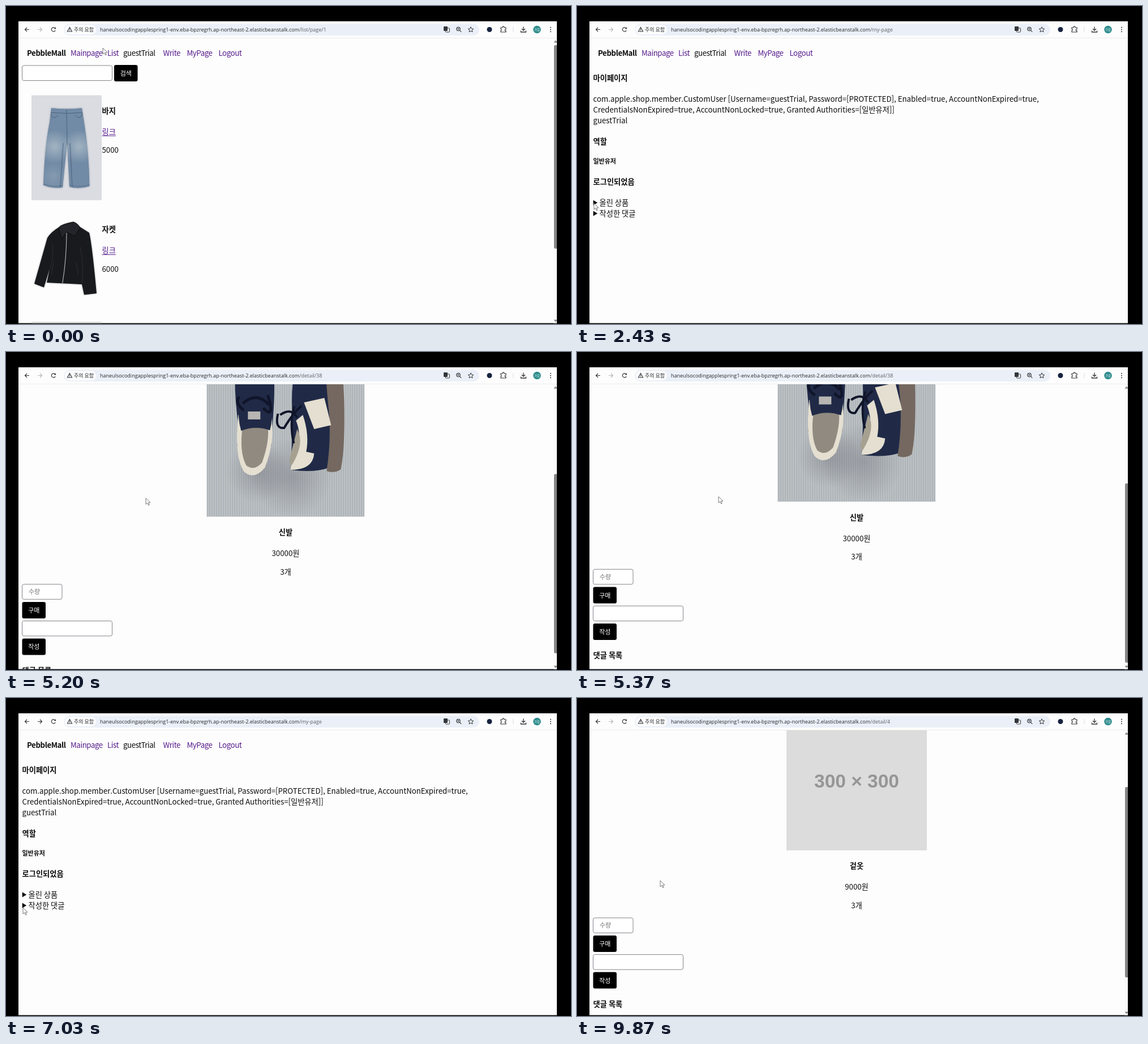
Animation, 998 px wide and 561 px high, one loop 9910 ms. Source, as an HTML page with a canvas:

```html
<!DOCTYPE html>
<html lang="ko">
<head>
<meta charset="utf-8">
<style>
html, body { margin: 0; width: 100%; height: 100%; overflow: hidden; background: #000; }
canvas { display: block; }
</style>
</head>
<body>
<canvas id="stage" width="998" height="561"></canvas>
<script>
const ctx = document.getElementById('stage').getContext('2d');
const LOOP = 9910;
const KR = '"Noto Sans CJK KR", "Noto Sans KR", "Noto Sans CJK", sans-serif';
const UI = '"Open Sans", "Noto Sans", sans-serif';
const BODY = 13.25, SMALL = 11;
const PURPLE = '#551a8b', INK = '#0c0c0c', PAGE = '#fdfdfd', ICON = '#33363a';
const USER = 'guestTrial';
const HOST = 'haneulsocodingapplespring1-env.eba-bpzregrh.ap-northeast-2.elasticbeanstalk.com';
const VIEW = { x: 22, y: 27, right: 973, bottom: 559.5, pageTop: 57 };

const pages = [
  { from: 0, path: '/list/page/1', draw: listPage },
  { from: 1500, path: '/my-page', draw: myPage },
  { from: 4250, path: '/detail/38', draw: shoePage },
  { from: 5900, path: '/my-page', draw: myPage },
  { from: 8200, path: '/detail/4', draw: coatPage }
];
const loading = [[1300, 1700], [4150, 4650], [5860, 6000], [8080, 8600]];
const pointer = [
  [250, 171, 74], [1000, 340, 84], [1550, 340, 84], [2300, 30, 348], [2650, 30, 348],
  [3500, 39.5, 448], [4550, 39.5, 448], [5250, 250, 255], [5450, 250, 255], [5750, 37, 42],
  [5920, 37, 42], [6800, 30, 370], [7250, 30, 370], [7850, 33, 469], [8600, 33, 469], [9400, 147, 322]
];

const between = (t, a, b) => t >= a && t < b;
function ease(t, a, b) {
  const k = Math.min(1, Math.max(0, (t - a) / (b - a)));
  return k * k * (3 - 2 * k);
}

// y is the optical middle of the line
function text(str, x, y, { size = BODY, weight = 400, color = INK, align = 'left', family = KR, spacing = 0 } = {}) {
  ctx.font = `${weight} ${size}px ${family}`;
  ctx.letterSpacing = spacing + 'px';
  ctx.textAlign = align;
  ctx.fillStyle = color;
  ctx.fillText(str, x, y + size * 0.365);
  return ctx.measureText(str).width;
}
const bold = (str, x, y, more) => text(str, x, y, { weight: 700, ...more });
function link(str, x, y) {
  const w = text(str, x, y, { color: PURPLE });
  ctx.fillRect(x, y + 6.5, w, 1);
}
function box(x, y, w, h, r, fill, stroke) {
  ctx.beginPath();
  ctx.roundRect(x, y, w, h, r);
  if (fill) { ctx.fillStyle = fill; ctx.fill(); }
  if (stroke) { ctx.strokeStyle = stroke; ctx.lineWidth = 1; ctx.stroke(); }
}
function shape(d, fill, stroke, width = 1) {
  const p = new Path2D(d);
  if (fill) { ctx.fillStyle = fill; ctx.fill(p); }
  if (stroke) { ctx.strokeStyle = stroke; ctx.lineWidth = width; ctx.stroke(p); }
}
function disc(x, y, r, fill, stroke, width = 1) {
  ctx.beginPath();
  ctx.arc(x, y, r, 0, Math.PI * 2);
  if (fill) { ctx.fillStyle = fill; ctx.fill(); }
  if (stroke) { ctx.strokeStyle = stroke; ctx.lineWidth = width; ctx.stroke(); }
}
function glow(x, y, r, rgb, alpha) {
  const g = ctx.createRadialGradient(x, y, 0, x, y, r);
  g.addColorStop(0, `rgba(${rgb},${alpha})`);
  g.addColorStop(1, `rgba(${rgb},0)`);
  ctx.fillStyle = g;
  ctx.fillRect(x - r, y - r, r * 2, r * 2);
}
const field = (x, y, w) => box(x, y, w, 26.5, 3, '#fff', '#85858d');
function button(label, x, y, w) {
  box(x, y, w, 29, 3, '#000');
  text(label, x + w / 2, y + 15, { size: SMALL, color: '#fff', align: 'center' });
}

function toolbar(t, page) {
  ctx.fillStyle = PAGE;
  ctx.fillRect(VIEW.x, VIEW.y, VIEW.right - VIEW.x, 30);
  ctx.fillStyle = '#ececea';
  ctx.fillRect(VIEW.x, 56, VIEW.right - VIEW.x, 1);

  const forwardOn = between(t, 5900, 8200);
  shape('M41 41.5H33.5M37 38L33.5 41.5L37 45', null, ICON, 1.2);
  shape('M56 41.5H63.5M60 38L63.5 41.5L60 45', null, forwardOn ? ICON : '#b4b6b9', 1.2);
  if (loading.some(([a, b]) => between(t, a, b))) {
    shape('M81 38.5L87 44.5M87 38.5L81 44.5', null, ICON, 1.2);
  } else {
    shape('M87.2 43A3.6 3.6 0 1 1 86.8 39.2', null, ICON, 1.2);
    shape('M88 37.2V40.6H84.6Z', ICON);
  }

  box(102, 31.5, 734, 20.5, 10.2, '#ebf0f8');
  box(104, 33.5, 55, 16.5, 8.2, '#fdfdfe');
  shape('M112.5 37.5L116.6 45H108.4Z', null, ICON, 1.1);
  shape('M112.5 40V42.4M112.5 43.2V44.2', null, ICON);
  text('주의 요함', 120, 41.5, { size: 9, color: '#25272a' });
  const w = text(HOST, 166, 41.5, { size: 9, color: '#25272a', family: UI });
  text(page.path, 166 + w, 41.5, { size: 9, color: '#5b5f65', family: UI });

  if (!between(t, 8200, 8600)) {
    box(776.5, 39, 7, 7, 1, '#fdfdfe', ICON);
    box(773, 36, 7, 8, 1, ICON);
  }
  disc(799, 40.5, 3.2, null, ICON, 1.2);
  shape('M801.3 42.8L804.3 45.8M797.4 40.5H800.6M799 38.9V42.1', null, ICON, 1.1);
  shape('M821 36.8L822.4 40L825.8 40.3L823.2 42.5L824 45.9L821 44.1L818 45.9L818.8 42.5L816.2 40.3L819.6 40Z', null, ICON);
  disc(854, 41.5, 4.5, '#17233f');
  shape('M874 38H877V37.4A1.5 1.5 0 0 1 880 37.4V38H883V41H882.6A1.4 1.4 0 0 0 882.6 43.8H883V46H874V43.6A1.8 1.8 0 0 0 874 40.2Z', null, ICON, 1.2);
  ctx.fillStyle = '#d5dbe6';
  ctx.fillRect(895.5, 37, 1, 9);
  shape('M914 36.5V43M911 40.3L914 43.2L917 40.3M909.5 43.5V46H918.5V43.5', null, ICON, 1.3);
  disc(938, 41.5, 6.8, '#2f8c8d');
  text('가람', 938, 41.5, { size: 5.5, color: '#d8eeee', align: 'center' });
  for (const y of [37.8, 41.5, 45.2]) disc(962, y, 1, ICON);
}

function nav() {
  const items = [[114, 'Mainpage'], [179, 'List'], [207, USER], [277.5, 'Write'], [319.5, 'MyPage'], [375.5, 'Logout']];
  bold('PebbleMall', 37, 82.8, { spacing: -0.41 });
  for (const [x, label] of items) text(label, x, 82.8, { color: label === USER ? INK : PURPLE, spacing: -0.41 });
}

function scrollbar(content, scroll) {
  const track = 479, ratio = track / content;
  ctx.fillStyle = '#fafafa';
  ctx.fillRect(967, 57, 6, 503);
  box(968, 69 + scroll * ratio, 6, 503 * ratio, 2.5, '#858585');
  shape('M967.5 64.5L970.7 60.5L974 64.5Z', '#858585');
  shape('M967.5 553.5L970.7 557.5L974 553.5Z', '#858585');
}

function jeans() {
  ctx.fillStyle = '#dadce2';
  ctx.fillRect(45, 157.5, 124, 185);
  const body = 'M80 180Q107 183 134 180L138 205Q147 262 147.5 318Q129 324 112 319L108 242L100 320Q82 323 66 316Q68 250 77 205Z';
  ctx.save();
  ctx.shadowColor = 'rgba(90,95,105,.5)';
  ctx.shadowBlur = 3;
  shape(body, '#718aa5');
  ctx.restore();
  ctx.save();
  ctx.clip(new Path2D(body));
  glow(86, 248, 30, '178,194,204', 0.75);
  glow(129, 248, 30, '178,194,204', 0.75);
  glow(84, 300, 24, '150,170,186', 0.5);
  shape('M79 188Q107 191 136 188M107 183L108 245M79 190Q82 202 92 193M135 190Q131 202 122 193', null, '#4b637f');
  shape('M101 242L96 320M113 242L117 320', null, 'rgba(72,94,122,.5)', 2);
  shape('M66 314Q82 320 101 317M112 316Q130 321 148 315', null, '#5b728b');
  ctx.restore();
}

function jacket() {
  ctx.save();
  ctx.shadowColor = 'rgba(60,60,60,.45)';
  ctx.shadowBlur = 3;
  shape('M94 390L119 381L131 390L147 400Q152 420 160 507L138 509.5L134 491L72 488L77 464L67 496.5L50 490L73 409Q80 398 94 390Z', '#191a1e');
  ctx.restore();
  shape('M93 391Q97 385 119 381Q128 384 131 392L121 406L107 399L98 411Z', '#24252a', '#08090b');
  shape('M78 464Q85 440 82 420M134 490Q138 455 131 425M124 453L128 474M84 453L80 474', null, '#2c2e34');
  shape('M107 400Q107 445 99.5 491', null, '#b9bbbd', 1.1);
}

function listPage() {
  nav();
  field(28.5, 105, 159);
  button('검색', 191, 104, 41.5);
  jeans();
  jacket();
  ctx.fillStyle = '#dcdcdc';
  ctx.fillRect(45, 557, 124, 4);
  [['바지', '5000'], ['자켓', '6000']].forEach(([name, price], i) => {
    const y = 185 + i * 209.6;
    bold(name, 169.5, y);
    link('링크', 169.5, y + 37);
    text(price, 169.5, y + 69.3);
  });
  scrollbar(671, 0);
}

function summary(label, y, open) {
  shape(open ? `M28 ${y - 3.5}H37L32.5 ${y + 4}Z` : `M28.7 ${y - 4.5}V${y + 4.5}L36.2 ${y}Z`, INK);
  text(label, 39.5, y);
}
function entry(name, note, y) {
  bold(name, 28.5, y);
  text(note, 28.5, y + 37);
  link('링크', 28.5, y + 69);
}

function myPage(t) {
  const goodsOpen = between(t, 2600, 4250), notesOpen = between(t, 7100, 8200);
  const notesY = goodsOpen ? 485 : 366;
  nav();
  bold('마이페이지', 28.5, 127);
  text(`com.apple.shop.member.CustomUser [Username=${USER}, Password=[PROTECTED], Enabled=true, AccountNonExpired=true,`, 28.5, 163.8);
  text('CredentialsNonExpired=true, AccountNonLocked=true, Granted Authorities=[일반유저]]', 28.5, 182.9);
  text(USER, 28.5, 202);
  bold('역할', 28.5, 238.7);
  bold('일반유저', 28.5, 274.3, { size: SMALL });
  bold('로그인되었음', 28.5, 310);
  summary('올린 상품', 347, goodsOpen);
  if (goodsOpen) entry('신발', '30000', 384);
  summary('작성한 댓글', notesY, notesOpen);
  if (notesOpen) entry('겉옷', '좋아요', 403);
}

function detail(name, price, nameY, mid) {
  const center = { align: 'center' };
  nav();
  bold('상세페이지', mid, 127, center);
  bold(name, mid, nameY, center);
  text(price, mid, nameY + 37, center);
  text('3개', mid, nameY + 69.3, center);
  field(28.5, nameY + 91.3, 70.5);
  text('수량', 40, nameY + 104.5, { size: SMALL, color: '#757575' });
  button('구매', 28.5, nameY + 122.5, 41.5);
  field(28.5, nameY + 156, 159);
  button('작성', 28.5, nameY + 187, 41.5);
  bold('댓글 목록', 28.5, nameY + 243.5);
}

function shoes() {
  const navy = '#202a47', cream = '#e4dfd0', sole = '#746860';
  ctx.save();
  ctx.translate(354.3, 153.5);
  ctx.beginPath();
  ctx.rect(0, 0, 279, 369.5);
  ctx.clip();
  ctx.fillStyle = '#bdc1c3';
  ctx.fillRect(0, 0, 279, 370);
  ctx.fillStyle = '#a9afb7';
  for (let x = 1; x < 279; x += 4) ctx.fillRect(x, 0, 1.4, 370);
  glow(150, 300, 70, '95,95,105', 0.35);
  glow(90, 290, 55, '95,95,105', 0.35);

  shape('M55 200C45 120 48 35 86 25C119 35 124 120 117 200L114 245L54 245Z', navy);
  shape('M56 190Q48 262 66 290Q84 306 103 283Q122 235 114 190Q88 205 56 190Z', cream);
  shape('M64 207Q57 255 70 279Q84 290 98 274Q112 235 108 207Q86 216 64 207Z', '#918a80');
  shape('M58 165H113Q118 195 112 217Q86 208 61 218Q54 195 58 165Z', navy);
  ctx.fillStyle = '#b7b6b2';
  ctx.fillRect(73, 184, 22, 14);
  shape('M64 170Q88 148 110 172M66 182Q48 168 58 158M100 178Q122 200 108 155', null, '#10152a', 5);

  shape('M152 195C145 120 165 35 210 25C238 38 238 110 240 180L235 270Q215 295 148 287Q152 240 150 200Z', navy);
  shape('M224 35Q241 95 243 163Q245 250 237 286Q226 294 212 289Q222 225 214 163Q206 90 224 35Z', sole);
  shape('M170 190Q182 225 176 255L190 258Q188 287 148 287Q150 266 160 248Q168 225 158 200Z', cream);
  shape('M160 215Q174 240 151 278Q144 278 148 262Z', '#a6a091');
  shape('M172 168L208 160L220 208L190 215Z', cream);
  shape('M126 188Q120 215 137 213Q154 185 168 174M130 190Q150 176 160 195M155 175Q146 205 154 240', null, '#10152a', 4);
  ctx.restore();
}

function shoePage(t) {
  const loaded = t >= 4650;
  const scroll = 259 * ease(t, 4800, 5300);
  ctx.save();
  ctx.translate(0, -scroll);
  detail('신발', '30000원', loaded ? 551 : 181.3, loaded ? 494 : 499);
  if (loaded) shoes();
  ctx.restore();
  if (loaded) scrollbar(762, scroll);
}

function coatPage(t) {
  const scroll = 131.7 * ease(t, 9300, 9870);
  ctx.save();
  ctx.translate(0, -scroll);
  detail('겉옷', '9000원', 428.3, 494);
  ctx.fillStyle = '#dcdcdc';
  ctx.fillRect(370, 153.5, 248, 247);
  text('300 × 300', 494, 277, { size: 33.5, weight: 700, color: '#969696', align: 'center', family: '"Liberation Sans", Arial, sans-serif' });
  ctx.restore();
  scrollbar(717, scroll);
}

function cursor(t) {
  let [, x, y] = pointer[0];
  for (let i = 1; i < pointer.length; i++) {
    const [t0, x0, y0] = pointer[i - 1], [t1, x1, y1] = pointer[i];
    if (t < t0) break;
    const k = ease(t, t0, t1);
    x = x0 + (x1 - x0) * k;
    y = y0 + (y1 - y0) * k;
  }
  ctx.save();
  ctx.translate(x, y);
  shape('M0 0V11L2.6 8.6L4.6 12.8L6.3 12L4.4 8H8Z', '#fff', '#6a6a6e', 0.9);
  ctx.restore();
}

function frame(now) {
  const t = now % LOOP;
  const page = pages.findLast(p => t >= p.from);
  ctx.fillStyle = '#000';
  ctx.fillRect(0, 0, 998, 561);
  ctx.save();
  ctx.beginPath();
  ctx.rect(VIEW.x, VIEW.y, VIEW.right - VIEW.x, VIEW.bottom - VIEW.y);
  ctx.clip();
  ctx.fillStyle = PAGE;
  ctx.fillRect(0, 0, 998, 561);
  page.draw(t);
  toolbar(t, page);
  cursor(t);
  ctx.restore();
}

const start = performance.now();
function tick() {
  frame(performance.now() - start);
  requestAnimationFrame(tick);
}
tick();
</script>
</body>
</html>
```
